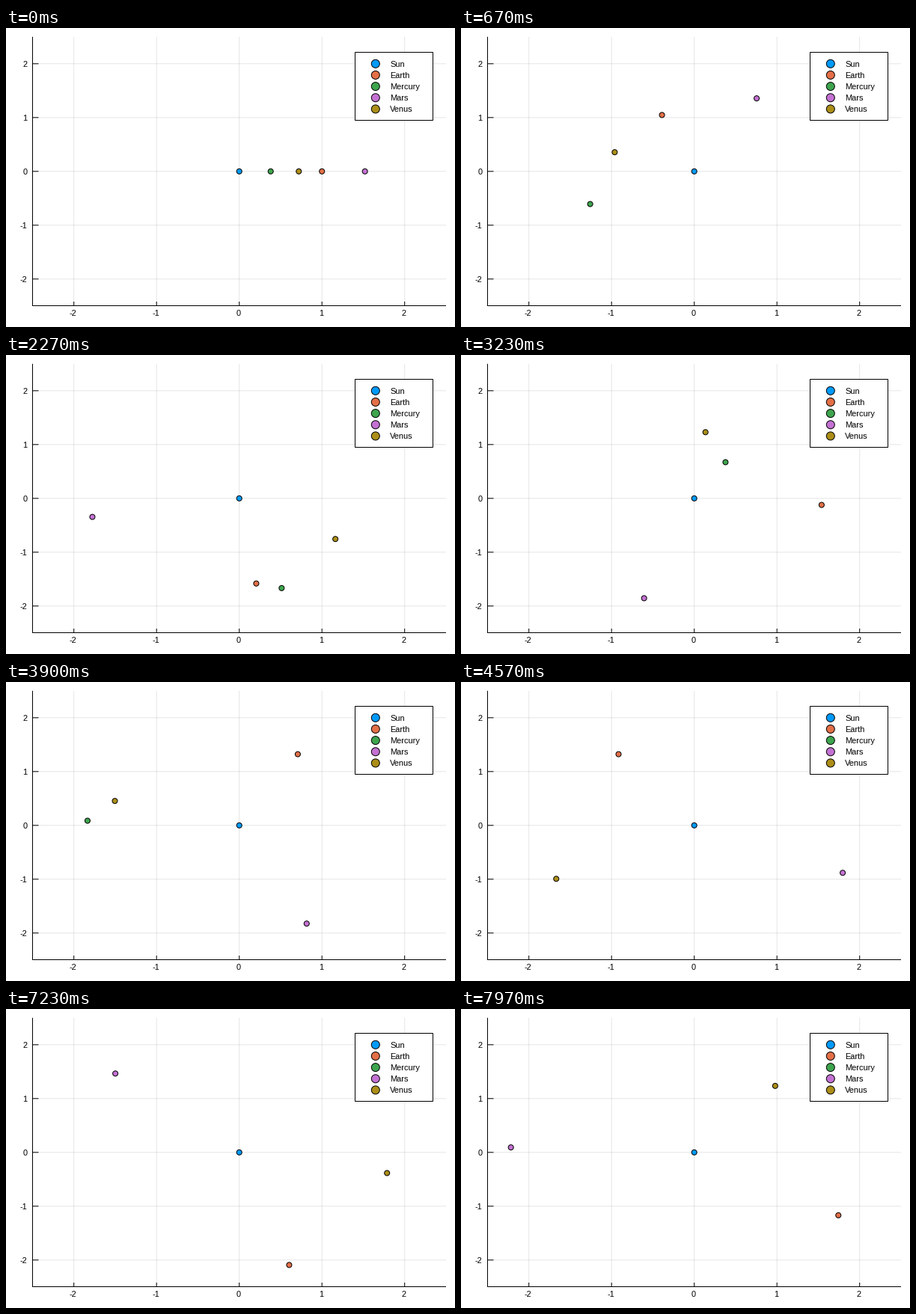
Animation of 600x400 px, one loop 8 s. Source, as a matplotlib script:

```python
import numpy as np
import matplotlib.pyplot as plt
from matplotlib.animation import FuncAnimation
from matplotlib.patches import Circle, Rectangle

W, H = 600, 400
PX = 0.72                      # points per pixel at 100 dpi
FRAMES, LOOP = 240, 8000
DT, SUBSTEPS = 0.05, 2

LEFT, RIGHT, TOP, BOTTOM = 35.5, 588, 11.8, 371.5
CX, CY, SX, SY = 311.7, 191.8, 110.5, 72

# name, colour, starting distance from the centre
BODIES = [
    ("Sun", "#009AFA", 0),
    ("Earth", "#E36F47", 1),
    ("Mercury", "#3EA44E", 0.38),
    ("Mars", "#C371D2", 1.52),
    ("Venus", "#AC8E18", 0.72),
]

plt.rcParams["font.family"] = "Liberation Sans"
plt.rcParams["font.size"] = 11 * PX


def to_px(z):
    return CX + SX * z.real, CY - SY * z.imag


def orbit(radius):
    """Explicit Euler steps from a circular start; the path spirals outwards."""
    if radius == 0:
        return np.zeros(FRAMES, complex)
    pos, vel = complex(radius), 1j / np.sqrt(radius)
    path = []
    for _ in range(FRAMES):
        path.append(pos)
        for _ in range(SUBSTEPS):
            acc = -pos / abs(pos) ** 3
            pos, vel = pos + DT * vel, vel + DT * acc
    return np.array(path)


fig = plt.figure(figsize=(W / 100, H / 100), dpi=100, facecolor="white")
ax = fig.add_axes([0, 0, 1, 1])
ax.set_xlim(0, W)
ax.set_ylim(H, 0)
ax.axis("off")


def line(x0, y0, x1, y1, z=2, **style):
    ax.plot([x0, x1], [y0, y1], color="black", lw=PX, snap=False,
            solid_capstyle="butt", zorder=z, **style)


def disc(x, y, r, color, z):
    return ax.add_patch(Circle((x, y), r, facecolor=color, edgecolor="black",
                               lw=PX, zorder=z))


def label(x, y, text, **style):
    ax.text(x, y, text, va="baseline", zorder=7, **style)


# grid, ticks and tick labels
for v in range(-2, 3):
    x, y = to_px(complex(v, v))
    line(x, TOP, x, BOTTOM, z=1, alpha=0.1)
    line(LEFT, y, RIGHT, y, z=1, alpha=0.1)
    line(x, BOTTOM, x, BOTTOM - 5.5)
    line(LEFT, y, LEFT + 8, y)
    label(x - 0.9, 385, str(v), ha="center")
    label(28.5, y + 4, str(v), ha="right")
line(LEFT, TOP, LEFT, BOTTOM + 0.5)
line(LEFT - 0.5, BOTTOM, RIGHT, BOTTOM)

# legend
ax.add_patch(Rectangle((466.5, 32.5), 104, 91, facecolor="white",
                       edgecolor="black", lw=PX, snap=False, zorder=5))
for i, (name, color, _) in enumerate(BODIES):
    y = 47.8 + 15.15 * i
    disc(493.8, y, 5.5, color, 6)
    label(513, y + 4, name)

# moving bodies, clipped to the plot area
area = Rectangle((LEFT, TOP), RIGHT - LEFT, BOTTOM - TOP,
                 transform=ax.transData)
paths = [orbit(radius) for _, _, radius in BODIES]
dots = []
for i, (_, color, _) in enumerate(BODIES):
    dot = disc(*to_px(paths[i][0]), 3.5, color, 3 + i / 10)
    dot.set_clip_path(area)
    dots.append(dot)


def update(n):
    for dot, path in zip(dots, paths):
        dot.center = to_px(path[n])
    return dots


anim = FuncAnimation(fig, update, frames=FRAMES, interval=LOOP / FRAMES,
                     repeat=True, repeat_delay=0)
plt.show()
```
